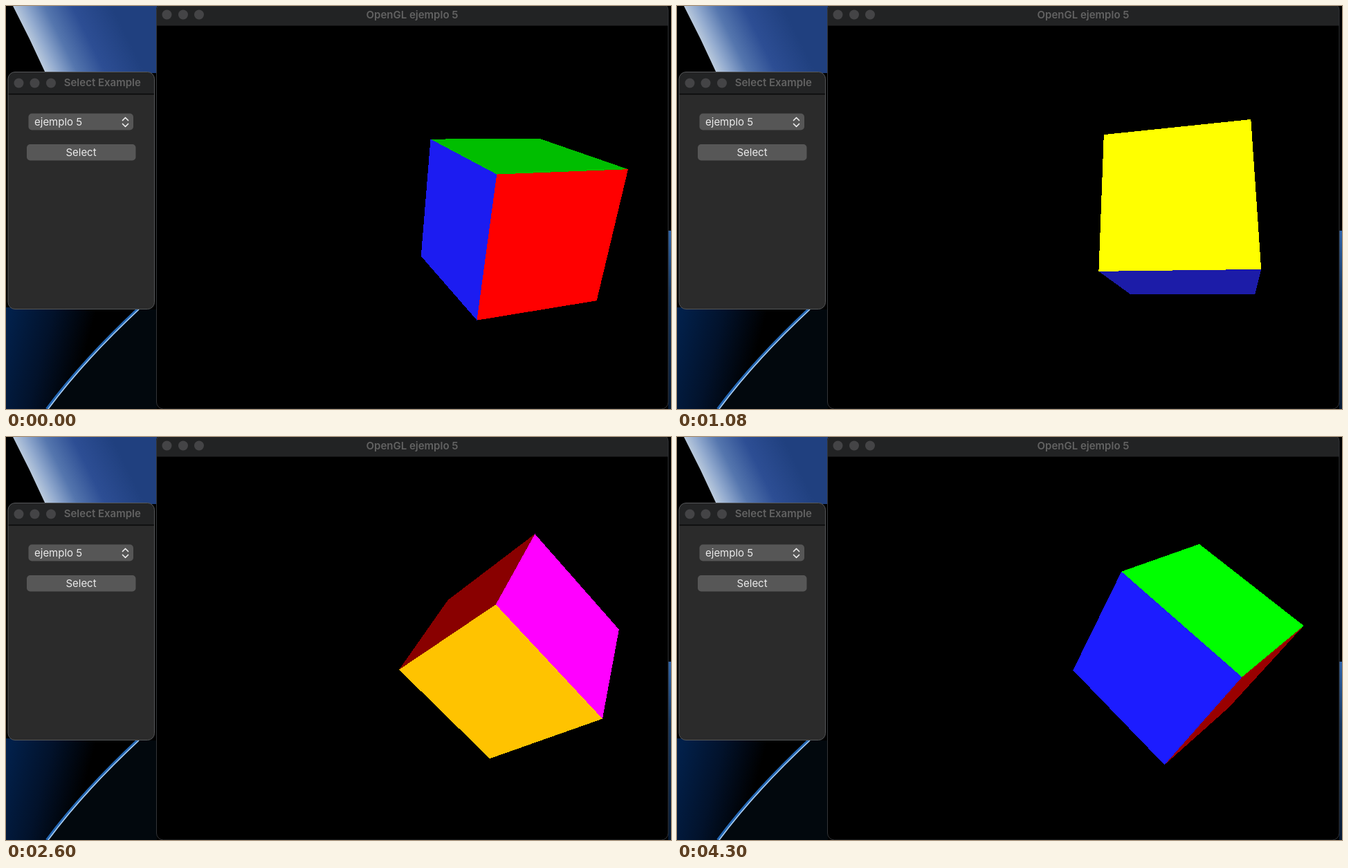
Recreate the animation shown at these times as an HTML page. Size 961 px wide and 583 px high, loop 4320 ms.

```html
<!DOCTYPE html>
<html lang="es">
<head>
<meta charset="utf-8">
<title>Cubo giratorio</title>
<style>
  html, body { margin: 0; width: 100%; height: 100%; overflow: hidden; background: #000; }
  svg { display: block; width: 961px; height: 583px; }
  text { font: 400 15px Inter, "Open Sans", sans-serif; fill: #ebebeb; }
  .title { font-weight: 600; fill: #626262; }
  .mid { text-anchor: middle; }
  .light { fill: #444446; }
</style>
</head>
<body>
<svg viewBox="0 0 961 583">
  <defs>
    <linearGradient id="sky" gradientUnits="userSpaceOnUse" x1="33" y1="47" x2="148" y2="-10">
      <stop offset="0" stop-color="#b9c9dc"/>
      <stop offset=".12" stop-color="#93abcf"/>
      <stop offset=".32" stop-color="#5576ae"/>
      <stop offset=".6" stop-color="#2d4e94"/>
      <stop offset="1" stop-color="#20407f"/>
    </linearGradient>
    <linearGradient id="sea" gradientUnits="userSpaceOnUse" x1="0" y1="470" x2="115" y2="500">
      <stop offset="0" stop-color="#02204a"/>
      <stop offset=".5" stop-color="#02122b"/>
      <stop offset="1" stop-color="#000"/>
    </linearGradient>
    <linearGradient id="strip" x1="0" y1="0" x2="0" y2="1">
      <stop offset="0" stop-color="#2f64a8"/>
      <stop offset=".35" stop-color="#16375f"/>
      <stop offset="1" stop-color="#071a33"/>
    </linearGradient>
  </defs>

  <!-- desktop -->
  <path d="M10 0Q35 48 57 97H218V0Z" fill="url(#sky)"/>
  <rect y="436" width="218" height="147" fill="url(#sea)"/>
  <path d="M192 439Q112 514 61 583H218V439Z" fill="#02080d"/>
  <g fill="none">
    <path d="M190 439Q110 514 59 583" stroke="#2467b4" stroke-width="4"/>
    <path d="M192 439Q112 514 61 583" stroke="#a9cdf0" stroke-width="1.6"/>
  </g>
  <rect x="957" y="325" width="4" height="258" fill="url(#strip)"/>

  <!-- selector window -->
  <rect x="3" y="95.5" width="211.5" height="343" rx="10" fill="#2b2b2b"/>
  <path d="M3 127V105.500a10 10 0 0 1 10-10H204.500a10 10 0 0 1 10 10V127Z" fill="#232425"/>
  <path d="M3 127.500H214" stroke="#080808" stroke-width="1.500"/>
  <rect x="3" y="95.5" width="211.5" height="343" rx="10" fill="none" stroke="#555759"/>
  <g class="light">
    <circle cx="18.500" cy="111.500" r="7"/><circle cx="41.500" cy="111.500" r="7"/><circle cx="65" cy="111.500" r="7"/>
  </g>
  <text class="title mid" x="139.300" y="116">Select Example</text>
  <rect x="32.500" y="155.500" width="151.500" height="24" rx="5" fill="#565656"/>
  <text x="41" y="173">ejemplo 5</text>
  <path d="M168.500 165.500l4-4 4 4M168.500 170.500l4 4 4-4" fill="none" stroke="#ececec" stroke-width="1.700" stroke-linecap="round" stroke-linejoin="round"/>
  <rect x="30" y="200" width="157.500" height="23.500" rx="5" fill="#575757"/>
  <text class="mid" x="108.500" y="217">Select</text>

  <!-- drawing window -->
  <rect x="217" y="-4" width="740" height="587" rx="10" fill="#000"/>
  <path d="M217 28.500V6a10 10 0 0 1 10-10H947a10 10 0 0 1 10 10V28.500Z" fill="#222324"/>
  <rect x="217.500" y="-4" width="739.500" height="587" rx="10" fill="none" stroke="#333538"/>
  <g class="light">
    <circle cx="232.500" cy="12.500" r="7"/><circle cx="256" cy="12.500" r="7"/><circle cx="279" cy="12.500" r="7"/>
  </g>
  <text class="title mid" x="587" y="17.500">OpenGL ejemplo 5</text>
  <g id="cube" shape-rendering="crispEdges"></g>
</svg>

<script>
const LOOP = 4320;
const CENTER = { x: 587.3, y: 306.8 };
const FOCAL = 670;               // 45 degree vertical field of view
const OFFSET = [1.5, 0, -7];
const BLUE_FLOOR = 28;

// axis index, side and colour of each face
const FACES = [
  { axis: 0, side: -1, color: [0, 0, 255], floor: BLUE_FLOOR },
  { axis: 0, side: 1, color: [255, 0, 255] },
  { axis: 1, side: 1, color: [0, 255, 0] },
  { axis: 1, side: -1, color: [255, 128, 0] },
  { axis: 2, side: 1, color: [255, 0, 0] },
  { axis: 2, side: -1, color: [255, 255, 0] }
];
const CORNERS = [[-1, -1], [1, -1], [1, 1], [-1, 1]];

const cube = document.getElementById('cube');
for (const face of FACES) {
  face.node = document.createElementNS('http://www.w3.org/2000/svg', 'polygon');
  cube.append(face.node);
}

// Images of the three unit axes after turning around (1, 1, 0).
function turnedAxes(degrees) {
  const a = degrees * Math.PI / 180;
  const c = Math.cos(a), q = Math.sin(a) / Math.SQRT2;
  const same = (1 + c) / 2, swap = (1 - c) / 2;
  return [[same, swap, -q], [swap, same, q], [q, -q, c]];
}

function project([x, y, z]) {
  return [CENTER.x - FOCAL * x / z, CENTER.y + FOCAL * y / z];
}

function shade(face, normal) {
  const light = Math.max(0.2, 0.05 + 2 * normal[2] - 0.2 * normal[0]);
  const channels = face.color.map(v =>
    Math.round(Math.max(face.floor || 0, Math.min(255, v * light))));
  return `rgb(${channels})`;
}

function drawFace(face, axes) {
  const normal = axes[face.axis].map(v => v * face.side);
  const u = axes[(face.axis + 1) % 3], v = axes[(face.axis + 2) % 3];
  const middle = normal.map((n, i) => n + OFFSET[i]);
  const facing = normal.reduce((sum, n, i) => sum + n * middle[i], 0) < 0;
  face.node.style.display = facing ? '' : 'none';
  if (!facing) return;
  const points = CORNERS.map(([a, b]) =>
    project(middle.map((m, i) => m + a * u[i] + b * v[i])).map(n => n.toFixed(2)));
  face.node.setAttribute('points', points.join(' '));
  face.node.setAttribute('fill', shade(face, normal));
}

// The cube jumps 25 degrees every 280 ms, with one extra jump at the start.
function angleAt(t) {
  const jumps = Math.floor((t + 50) / 280) + (t >= 16 ? 1 : 0);
  return 30 + 25 * jumps;
}

function render(t) {
  const axes = turnedAxes(angleAt(t));
  FACES.forEach(face => drawFace(face, axes));
}

const start = performance.now();
function tick() {
  render((performance.now() - start) % LOOP);
  requestAnimationFrame(tick);
}
tick();
</script>
</body>
</html>
```
